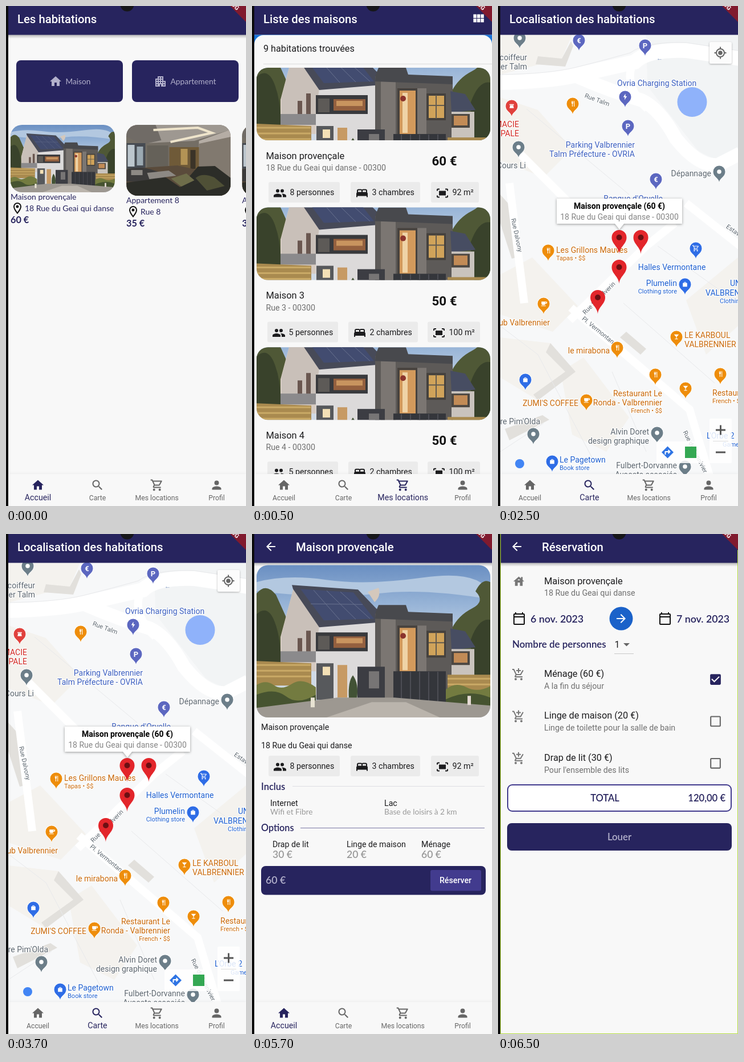
An HTML page with a canvas that plays this animation: 421 px wide and 875 px high, repeating every 8 s.

```html
<!DOCTYPE html>
<html lang="fr">
<head>
<meta charset="utf-8">
<title>Les habitations</title>
<style>
html, body { margin: 0; width: 100%; height: 100%; overflow: hidden; background: #f8f8f8; }
canvas { display: block; width: 421px; height: 875px; }
</style>
</head>
<body>
<canvas id="stage" width="421" height="875"></canvas>
<script>
const c = document.getElementById('stage').getContext('2d');
const W = 421, H = 875;
const NAVY = '#27245e', PAPER = '#f8f8f8', INK = '#1c1c1e', GRAY = '#707070', PALE = '#b2b0cb';
const ROBOTO = 'Roboto, sans-serif', LATO = 'Lato, sans-serif';
const ADDRESS = '18 Rue du Geai qui danse', ZIP = ' - 00300', HOME = 'Maison provençale';

const ICONS = {
  home: 'M10 20v-6h4v6h5v-8h3L12 3 2 12h3v8z',
  house: 'M19 9.3V4h-3v2.6L12 3 2 12h3v8h5v-6h4v6h5v-8h3zM10 10c0-1.1.9-2 2-2s2 .9 2 2z',
  search: 'M15.5 14h-.8l-.3-.3A6.5 6.5 0 1 0 13.7 14.4l.3.3v.8l5 5 1.5-1.5zM9.5 14A4.5 4.5 0 1 1 9.5 5 4.5 4.5 0 0 1 9.5 14z',
  cart: 'M15.55 13c.75 0 1.41-.41 1.75-1.03l3.58-6.49A1 1 0 0 0 20 4H5.21l-.94-2H1v2h2l3.6 7.59-1.35 2.44C4.52 15.37 5.48 17 7 17h12v-2H7l1.1-2zM6.16 6h12.15l-2.76 5H8.53zM7 18a2 2 0 1 0 0 4 2 2 0 0 0 0-4zM17 18a2 2 0 1 0 0 4 2 2 0 0 0 0-4z',
  person: 'M12 12a4 4 0 1 0 0-8 4 4 0 0 0 0 8zm0 2c-2.67 0-8 1.34-8 4v2h16v-2c0-2.66-5.33-4-8-4z',
  people: 'M16 11a3 3 0 1 0-3-3 3 3 0 0 0 3 3zM8 11a3 3 0 1 0-3-3 3 3 0 0 0 3 3zm0 2c-2.33 0-7 1.17-7 3.5V19h14v-2.5c0-2.33-4.67-3.5-7-3.5zm8 0l-1 .05c1.2.84 2 1.97 2 3.45V19h6v-2.5c0-2.33-4.67-3.5-7-3.5z',
  bed: 'M21 10.8V8a3 3 0 0 0-3-3h-4a3 3 0 0 0-2 .8A3 3 0 0 0 10 5H6a3 3 0 0 0-3 3v2.8A3 3 0 0 0 2 13v6h2v-2h16v2h2v-6a3 3 0 0 0-1-2.2zM14 7h4a1 1 0 0 1 1 1v2h-6V8a1 1 0 0 1 1-1zM5 8a1 1 0 0 1 1-1h4a1 1 0 0 1 1 1v2H5z',
  area: 'M17 4h3a2 2 0 0 1 2 2v2h-2V6h-3zM4 8V6h3V4H4a2 2 0 0 0-2 2v2zm16 8v2h-3v2h3a2 2 0 0 0 2-2v-2zM7 18H4v-2H2v2a2 2 0 0 0 2 2h3zM18 8H6v8h12z',
  flats: 'M17 11V3H7v4H3v14h8v-4h2v4h8V11z' +
    [[5, 17], [5, 13], [5, 9], [9, 13], [9, 9], [9, 5], [13, 13], [13, 9], [13, 5], [17, 17], [17, 13]]
      .map(([x, y]) => `M${x} ${y}h2v2h-2z`).join(''),
  place: 'M12 2a7 7 0 0 0-7 7c0 5.25 7 13 7 13s7-7.75 7-13a7 7 0 0 0-7-7zM7 9a5 5 0 0 1 10 0c0 2.9-2.9 7.2-5 9.9C9.9 16.2 7 11.9 7 9zM12 6.5a2.5 2.5 0 1 0 0 5 2.5 2.5 0 0 0 0-5z',
  back: 'M20 11H7.83l5.59-5.59L12 4l-8 8 8 8 1.41-1.41L7.83 13H20z',
  next: 'M12 4l-1.41 1.41L16.17 11H4v2h12.17l-5.58 5.59L12 20l8-8z',
  date: 'M20 3h-1V1h-2v2H7V1H5v2H4a2 2 0 0 0-2 2v16a2 2 0 0 0 2 2h16a2 2 0 0 0 2-2V5a2 2 0 0 0-2-2zM20 5v3H4V5zM20 21H4V10h16z',
  grid: 'M4 5h5v6H4zM10 5h5v6h-5zM16 5h5v6h-5zM4 12h5v6H4zM10 12h5v6h-5zM16 12h5v6h-5z',
  checked: 'M19 3H5a2 2 0 0 0-2 2v14a2 2 0 0 0 2 2h14a2 2 0 0 0 2-2V5a2 2 0 0 0-2-2zm-9 14l-5-5 1.4-1.4 3.6 3.6 7.6-7.6L19 8z',
  unchecked: 'M19 3H5a2 2 0 0 0-2 2v14a2 2 0 0 0 2 2h14a2 2 0 0 0 2-2V5a2 2 0 0 0-2-2zm0 16H5V5h14z',
  fork: 'M8 3v6a3 3 0 0 0 2 2.8V21h2v-9.2A3 3 0 0 0 14 9V3h-1.4v5h-1V3h-1.2v5h-1V3zM16 3v18h2V3z',
  cup: 'M5 5h15a3 3 0 0 1 0 7h-2a4 4 0 0 1-4 4H9a4 4 0 0 1-4-4zM18 7v3h2V7zM4 18h15v2H4z',
  glass: 'M4 4h16l-7 8v6h4v2H7v-2h4v-6z',
  bag: 'M5 8h3a4 4 0 0 1 8 0h3v12H5zM10 8h4a2 2 0 0 0-4 0z',
  bolt: 'M13 2L6 13h5l-1 9 8-12h-5z',
  jar: 'M5 6h14v3H5zM7 10h10l2 9H5z',
  dot: 'M12 6a6 6 0 1 0 0 12 6 6 0 0 0 0-12z'
};
for (const k in ICONS) ICONS[k] = new Path2D(ICONS[k]);

function text(s, x, y, size = 14.2, color = INK, o = {}) {
  c.font = `${o.w || 400} ${size}px ${o.f || ROBOTO}`;
  c.textAlign = o.a || 'left';
  c.fillStyle = color;
  if (o.halo) {
    c.strokeStyle = 'rgba(255,255,255,.85)';
    c.lineWidth = 2.5;
    c.lineJoin = 'round';
    c.strokeText(s, x, y);
  }
  c.fillText(s, x, y);
}
const lato = (s, x, y, size = 14, color = NAVY, w = 400, a = 'left') => text(s, x, y, size, color, { w, a, f: LATO });

function turned(s, x, y, deg, size, color, o) {
  c.save();
  c.translate(x, y);
  c.rotate(deg * Math.PI / 180);
  text(s, 0, size * .35, size, color, { a: 'center', ...o });
  c.restore();
}
function icon(name, x, y, color, size = 24) {
  c.save();
  c.translate(x - size / 2, y - size / 2);
  c.scale(size / 24, size / 24);
  c.fillStyle = color;
  c.fill(ICONS[name], 'evenodd');
  c.restore();
}
function rect(x, y, w, h, color) { c.fillStyle = color; c.fillRect(x, y, w, h); }
function round(x, y, w, h, r, color) {
  c.beginPath();
  c.roundRect(x, y, w, h, r);
  if (color) { c.fillStyle = color; c.fill(); }
}
function disc(x, y, r, color) { c.fillStyle = color; c.beginPath(); c.arc(x, y, r, 0, 7); c.fill(); }
function shape(color, d) { c.fillStyle = color; c.fill(new Path2D(d)); }
function line(color, width, d) { c.strokeStyle = color; c.lineWidth = width; c.stroke(new Path2D(d)); }
function fade(y0, y1, ...colors) {
  const g = c.createLinearGradient(0, y0, 0, y1);
  colors.forEach((k, i) => g.addColorStop(i / (colors.length - 1), k));
  return g;
}
function shadowed(blur, color, draw) {
  c.save();
  c.shadowBlur = blur;
  c.shadowColor = color;
  c.shadowOffsetY = 1;
  draw();
  c.restore();
}

// Picture drawn around (cx, cy) in its own units, cropped to a rounded box
function photo(x, y, w, h, baseW, cx, cy, draw) {
  c.save();
  round(x, y, w, h, 20);
  c.clip();
  c.translate(x + w / 2, y + h / 2);
  c.scale(w / baseW, w / baseW);
  c.translate(-cx, -cy);
  draw();
  c.restore();
}
const house = (x, y, w, h) => photo(x, y, w, h, 410, 213, 187.5, () => {
  rect(0, 50, 421, 275, fade(54, 200, '#6a8fc2', '#9ab6d8', '#cfdae6'));
  shape('#b3c8e0', 'M8 84Q60 70 130 80T300 76T418 104V114Q300 94 220 104T8 100z');
  shape('#4f5836', 'M8 104Q24 84 42 106L62 150V230H8zM350 166Q362 142 386 130T392 100Q404 76 418 84V262H350z');
  shape('#39422b', 'M8 140Q28 122 40 154T50 230H8zM384 184Q398 146 418 150V246H384z');
  shape('#d6cbc2', 'M73 94L50 180V240H225V150L118 160z');
  shape('#c9c0b9', 'M73 94L52 176V212H110L118 160z');
  shape('#dcdada', 'M118 160L228 152V288H112V205z');
  shape('#474a58', 'M70 89L186 97 240 153 118 163 72 96z');
  shape('#424c70', 'M85 96L178 102 214 148 126 151z');
  line('#69728f', 1, 'M108 98L154 150M131 99L182 149M155 101L207 148M103 122L194 123');
  shape('#d4c8bc', 'M203 101L222 94Q227 108 215 119z');
  shape('#6a5750', 'M80 182h8v24h-8zM95 169h8v37h-8z');
  shape('#8b8a8c', 'M50 205H112V224H50z');
  rect(112, 172, 91, 33, '#393a3d');
  rect(143, 179, 56, 20, '#94603f');
  rect(148, 182, 46, 9, '#c8945f');
  rect(116, 178, 20, 24, '#5d5a57');
  shape('#5d5a58', 'M216 139L352 150V296H216z');
  shape('#7b7672', 'M226 148H252V290H226zM290 160H306V290H290z');
  shape('#48494d', 'M217 136L222 124H270L274 136 352 139V153L216 148z');
  rect(255, 160, 35, 84, '#47423e');
  rect(259, 164, 28, 76, '#d39a5c');
  rect(264, 168, 9, 70, '#efd3a6');
  disc(265, 178, 5, '#8b342d');
  rect(306, 169, 34, 47, '#45413d');
  rect(310, 173, 27, 39, '#d0a35a');
  line('#625b50', 2, 'M323 172V213M310 190H337');
  shape('#474d62', 'M348 165L374 170 392 198 350 203z');
  rect(350, 201, 40, 50, '#c9c3bd');
  rect(350, 205, 32, 24, '#4c4742');
  rect(354, 208, 24, 17, '#c28b56');
  shape('#a98a4f', 'M8 222L104 226V265H8zM343 246H418V274H343z');
  line('#c9a966', 3, 'M8 229H103M8 239H103M8 249H103M343 253H418M343 263H418');
  shape('#737b40', 'M8 264Q24 254 38 264T70 262T112 268V304H8zM340 272Q356 258 376 268T418 266V302H340z');
  shape('#465330', 'M8 281Q40 268 60 284T112 281V304H8zM340 289Q380 270 418 286V302H340z');
  rect(113, 226, 30, 64, '#57595c');
  rect(124, 232, 13, 15, '#f3e0b6');
  rect(150, 229, 17, 57, '#c79a64');
  shape('#425235', 'M170 288Q168 258 177 247Q188 262 184 288z');
  rect(185, 232, 48, 62, '#3c3d43');
  rect(205, 240, 18, 30, '#777575');
  rect(248, 240, 92, 57, '#34363b');
  line('#4c4d54', 2, 'M262 241V297M278 241V297M294 241V297M310 241V297M326 241V297');
  shape('#9d9891', 'M8 304L150 286H250L418 300V322H8z');
  shape('#bab4ac', 'M130 321L210 294H270L330 321z');
  rect(103, 286, 7, 17, '#e7e2d2');
  rect(378, 283, 6, 16, '#e4d9d2');
});
const lounge = (x, y) => photo(x, y, 183, 124, 183, 302, 270, () => {
  rect(205, 200, 200, 140, '#746e65');
  shape('#9e9891', 'M205 200H405V213L330 236 246 240 211 226z');
  shape('#706b66', 'M211 208H262L272 235 240 242 211 229z');
  line('#eee4cb', 4, 'M258 217L336 213 361 222 288 238');
  shape('#b5ada5', 'M338 236L394 216V332H338z');
  shape('#81796f', 'M338 241L394 229V332H338z');
  rect(211, 240, 33, 47, '#464b52');
  rect(213, 243, 12, 38, '#bcc6cd');
  rect(229, 246, 11, 33, '#9ba9b2');
  rect(247, 244, 37, 44, '#656159');
  rect(286, 247, 52, 41, '#6f5a38');
  rect(306, 250, 12, 28, '#b39355');
  rect(323, 252, 9, 33, '#3b3428');
  shape('#5a4b3b', 'M211 285L300 279 350 290 394 301V332H211z');
  shape('#3c3b3b', 'M211 286Q236 279 260 288L280 294 276 310 211 307z');
  shape('#8d8984', 'M219 287H239V296H219zM247 292L285 288 298 297 251 303z');
  shape('#2c2d28', 'M211 309L280 300 305 317 336 281 366 280 394 301V332H211z');
  shape('#4f5036', 'M332 301Q344 291 365 300L383 315 352 323z');
  shape('#6e6d4a', 'M289 302L316 293 330 305 307 316z');
});

function bar(title, back, lift = true) {
  if (lift) rect(4, 50, 417, 7, fade(50, 57, 'rgba(0,0,0,.28)', 'rgba(0,0,0,0)'));
  rect(4, 0, 417, 50.5, NAVY);
  if (back) icon('back', 33, 22, '#fff');
  text(title, back ? 77 : 20, 29.5, 20.3, '#fff', { w: 500 });
}
function frame() {
  shape('#801a2e', 'M393 0H421V28z');
  turned('BUG', 400, -2, 45, 10.5, '#fff', { w: 700 });
  disc(212.5, -2.5, 12, '#17171a');
  rect(0, 0, 4, H, '#0c0c0d');
}
const TABS = [['home', 'Accueil', 56], ['search', 'Carte', 160.5], ['cart', 'Mes locations', 264.7], ['person', 'Profil', 369.5]];
function tabs(active) {
  shadowed(5, 'rgba(0,0,0,.1)', () => rect(4, 819, 417, 56, PAPER));
  TABS.forEach(([name, label, x], i) => {
    const on = i === active, color = on ? NAVY : '#666';
    icon(name, x, 838.5, color);
    text(label, x, 864.5, on ? 14.2 : 12.2, color, { a: 'center' });
  });
}
function chips(y, xs, widths, labels) {
  ['people', 'bed', 'area'].forEach((name, i) => {
    round(xs[i], y, widths[i], 36, 3, '#ebebeb');
    icon(name, xs[i] + 20, y + 19.5, INK);
    text(labels[i], xs[i] + 37.5, y + 23);
  });
}
const firstChips = y => chips(y, [29, 173, 314], [125, 122, 84], ['8 personnes', '3 chambres', '92 m²']);

function offer(x, y, title, place, price) {
  lato(title, x, y);
  icon('place', x + 12, y + 15.5, '#111');
  lato(place, x + 25, y + 20);
  lato(price, x, y + 41, 16.3, NAVY, 700);
}
function homeScreen() {
  bar('Les habitations');
  round(18, 95, 187, 73, 8, NAVY);
  round(221, 95, 187, 73, 8, NAVY);
  icon('home', 87, 132, PALE);
  icon('flats', 271, 132, PALE);
  lato('Maison', 104.5, 137, 13.7, PALE);
  lato('Appartement', 288.5, 137, 13.8, PALE);
  house(8, 208, 183, 118);
  lounge(211, 208);
  lounge(414, 208);
  offer(8, 338.5, HOME, ADDRESS, '60 €');
  offer(211, 344.5, 'Appartement 8', 'Rue 8', '35 €');
  offer(414, 344.5, 'Appartement 9', 'Rue 9', '35 €');
  tabs(0);
}

function listScreen() {
  bar('Liste des maisons', false, false);
  icon('grid', 397, 22, '#fff', 26);
  rect(4, 50.5, 417, 20, '#1873d8');
  round(4, 51, 417, 824, [16, 16, 0, 0], PAPER);
  text('9 habitations trouvées', 20, 80, 16.2);
  rect(20, 101, 401, 1, '#dcdcdc');
  [[HOME, ADDRESS, '60 €'], ['Maison 3', 'Rue 3', '50 €'], ['Maison 4', 'Rue 4', '50 €']].forEach(([name, place, price], i) => {
    const y = 108 + i * 244.6;
    house(8, y, 410, 127);
    text(name, 24.5, y + 159.5, 16.4);
    text(place + ZIP, 24.5, y + 180, 14.2, GRAY);
    text(price, 315.5, y + 171, 22.3, '#111', { w: 700 });
    if (i) chips(y + 200, [27, 169, 308], [124, 122, 92], ['5 personnes', '2 chambres', '100 m²']);
    else firstChips(y + 200);
  });
  tabs(2);
}

const INDIGO = '#5c67c0', ORANGE = '#ee8d0b', BLUE = '#2f6de6', SLATE = '#6c7e89';
const SHOP = '#1d5fd0', FOOD = '#c9690a', PARK = '#3c5fc0', PLAIN = '#5d6770';
function pin(x, y, color, glyph) {
  const d = `M${x} ${y + 18}C${x - 1} ${y + 11} ${x - 10.5} ${y + 9} ${x - 10.5} ${y}a10.5 10.5 0 0 1 21 0C${x + 10.5} ${y + 9} ${x + 1} ${y + 11} ${x} ${y + 18}z`;
  line('#fff', 1.6, d);
  shape(color, d);
  if (ICONS[glyph]) icon(glyph, x, y, '#fff', glyph === 'dot' ? 15 : 13);
  else text(glyph, x, y + 4.7, 13, '#fff', { w: 700, a: 'center' });
}
function marker(x, y) {
  shape('#e3262b', `M${x} ${y}C${x - 1} ${y - 13} ${x - 13} ${y - 17} ${x - 13} ${y - 29}a13 13 0 0 1 26 0C${x + 13} ${y - 17} ${x + 1} ${y - 13} ${x} ${y}z`);
  disc(x, y - 29, 5, '#6c1013');
}
function label(color, x, y, rows, a = 'left', small) {
  rows.forEach((s, i) => text(s, x, y + i * 15.5, 14, color, { a, halo: true }));
  if (small) text(small, x, y + rows.length * 15.5 - 2.5, 11, color, { a, halo: true });
}
function streets() {
  rect(4, 50, 417, 770, '#f7f8f9');
  shape('#f4f2ee', 'M4 50H130L112 92 4 120zM4 160L70 182 130 250 80 300 4 270zM4 470L60 440 140 525 96 570 4 540zM4 580L92 590 136 640 70 690 4 650zM110 640L150 615 230 720 190 780 130 750zM330 515L421 440V560L365 610z');
  shape('#e2e0dc', 'M70 88L112 92 128 62 132 70 118 106 66 102zM4 330L22 350 34 440 24 442 4 380zM92 590L136 640 70 690 62 680 118 640 84 606zM12 740L78 716 90 724 20 760zM225 570L260 600 250 610 214 580z');
  shape('#f2f4f5', 'M260 50H421V258Q390 280 350 252L262 140z');
  line('#fff', 26, 'M0 134Q90 132 138 121T240 98Q262 76 330 78L425 92');
  line('#fff', 24, 'M140 124Q200 150 252 165Q284 180 312 232Q352 282 386 278L425 258');
  line('#fff', 14, 'M236 102Q220 140 262 180M126 550L260 420 310 380M128 528L336 706 372 825M20 310L46 520M40 260L150 370M330 345L425 420');
  line('#e8e9eb', 1, 'M4 120Q90 119 138 107T232 82Q258 62 330 64L421 78M50 180L230 330M4 560L70 610 170 800M220 520L380 660M280 420L421 520M200 640L260 780M4 780L80 730');
  disc(340.5, 168, 26, '#8fb2fa');
  text('←', 278, 95, 11, '#7993c0');
}
function mapScreen() {
  c.save();
  c.beginPath();
  c.rect(4, 50, 417, 769);
  c.clip();
  streets();
  const way = { halo: true };
  turned('Rue Talm', 174, 164, 20, 11, PLAIN, way);
  turned('Rue Dalvony', 33, 401, 78, 11, PLAIN, way);
  turned('Rue S. Malverin', 177, 511, -45, 11, PLAIN, way);
  turned('Pl. Vermontane', 178, 569, 39, 11, PLAIN, way);
  turned('Rue du Tonnivier', 346, 780, 63, 11, PLAIN, way);
  turned('Estavo', 415, 394, 35, 11, PLAIN, way);

  label(PLAIN, 51, 95, ['coiffeur', 'er Talm'], 'right');
  label(PARK, 209, 140, ['Ovria Charging Station']);
  label('#d0251f', 37, 212, ['MACIE', 'PALE'], 'right');
  label(PARK, 240, 248, ['Parking Valbrennier', 'Talm Préfecture - OVRIA'], 'right');
  label(PLAIN, 49, 284, ['Cours Li'], 'right');
  label(PLAIN, 374, 298, ['Dépannage'], 'right');
  label(PARK, 289, 342, ["Banque d'Orvelle"], 'right');
  label(FOOD, 102, 431.5, ['Les Grillons Mauves'], 'left', 'Tapas • $$');
  label(SHOP, 305, 462, ['Halles Vermontane'], 'center');
  label(SHOP, 314, 490, ['Plumelin'], 'right', 'Clothing store');
  label(SHOP, 407, 490, ['UN']);
  label(SHOP, 364, 507, ['VALBRENNIER']);
  text('Clothing', 389, 520, 11, SHOP, way);
  label(FOOD, 91, 559, ['Pub Valbrennier'], 'right');
  label(FOOD, 327, 581, ['LE KARBOUL', 'VALBRENNIER']);
  label(FOOD, 196, 608, ['le mirabona'], 'right');
  label(FOOD, 288, 683, ['Restaurant Le', 'Ronda - Valbrennier'], 'right', 'French • $$');
  label(FOOD, 376, 682, ['Restaurant'], 'left', 'French • $$');
  label(FOOD, 141, 700, ["ZUMI'S COFFEE"], 'right');
  label(PLAIN, 74, 732, ["re Pim'Olda"], 'right');
  label(PLAIN, 265, 750, ['Alvin Doret', 'design graphique'], 'right');
  label(SHOP, 108, 799, ['Le Pagetown'], 'left', 'Book store');
  label(PLAIN, 314, 809, ['Fulbert-Dorvanne', 'Avocats associés'], 'right');
  label(SHOP, 366, 757, ["L'Orbe 2"]);
  text('Games', 394, 771, 11, SHOP, way);

  [[38, 56, SLATE, 'dot'], [36, 247, SLATE, 'dot'], [388, 290, SLATE, 'dot'], [62, 749, SLATE, 'dot'],
   [279, 747, SLATE, 'dot'], [328, 806, SLATE, 'dot'], [142, 60, INDIGO, '€'], [277, 303, INDIGO, '€'],
   [258, 69, INDIGO, 'P'], [228, 210, INDIGO, 'P'], [223, 159, INDIGO, 'bolt'], [24, 175, '#e0413c', 'jar'],
   [131, 171, ORANGE, 'fork'], [88, 428, ORANGE, 'fork'], [209, 598, ORANGE, 'fork'], [276, 645, ORANGE, 'fork'],
   [390, 644, ORANGE, 'fork'], [80, 521, ORANGE, 'cup'], [155, 690, ORANGE, 'cup'], [313, 579, ORANGE, 'glass'],
   [329, 669, ORANGE, 'glass'], [347, 424, BLUE, 'cart'], [328, 487, BLUE, 'bag'], [48, 654, BLUE, 'bag'], [95, 797, BLUE, 'bag']
  ].forEach(p => pin(...p));
  [[212.5, 434], [250.5, 434], [212.5, 486], [175, 539]].forEach(p => marker(...p));

  shadowed(4, 'rgba(0,0,0,.4)', () => shape('#fff', 'M103 337H323V381H221L213 391 205 381H103z'));
  text(HOME + ' (60 €)', 213, 355, 14, '#000', { w: 700, a: 'center' });
  text(ADDRESS + ZIP, 213, 374, 14, '#858585', { a: 'center' });

  const panel = 'rgba(255,255,255,.84)';
  shadowed(3, 'rgba(0,0,0,.3)', () => round(371, 63, 39, 38, 2, '#fcfcfc'));
  round(371, 722, 39, 78, 2, panel);
  round(278, 762, 80, 38, 2, panel);
  line('#666', 2, 'M383 82a7 7 0 1 0 14 0a7 7 0 1 0-14 0M390 71.5V75M390 89V92.5M379.5 82H383M397 82H400.5');
  disc(390, 82, 3.8, '#666');
  rect(377, 761, 27, 1, '#ddd');
  line('#555', 2.8, 'M382 742H399M390.5 733.5V750.5M382 781H399');
  shape('#2f74e4', 'M297.5 770.5L308 781 297.5 791.5 287 781z');
  line('#fff', 2, 'M293.5 785V780H301M298.5 777L301.5 780 298.5 783');
  rect(328, 771, 20, 20, '#34a853');
  disc(38, 801, 8, '#4285f4');
  c.restore();
  bar('Localisation des habitations', false, false);
  tabs(1);
}

function detailScreen() {
  bar(HOME, true);
  house(8, 54.5, 410, 266.5);
  text(HOME, 16, 342.5);
  text(ADDRESS, 16, 375);
  firstChips(388);
  lato('Inclus', 16, 447.5, 16.5, NAVY, 600);
  rect(71, 441, 337, 1, '#dedee4');
  lato('Options', 16, 520, 16.2, NAVY, 600);
  rect(85, 514, 323, 1, '#7a78a5');
  [[32, 'Internet', 'Wifi et Fibre'], [232, 'Lac', 'Base de loisirs à 2 km']].forEach(([x, name, note]) => {
    text(name, x, 475.5);
    lato(note, x, 491, 13.6, '#999');
  });
  [[36, 'Drap de lit', '30 €'], [166, 'Linge de maison', '20 €'], [297, 'Ménage', '60 €']].forEach(([x, name, price]) => {
    text(name, x, 548);
    lato(price, x, 566.5, 17.5, '#999', 600);
  });
  round(16, 581, 394, 50.5, 8, NAVY);
  lato('60 €', 24, 612, 17.8, PALE, 600);
  round(313, 588, 89, 36.5, 3, '#423b8e');
  text('Réserver', 357, 611, 14.2, '#fff', { w: 500, a: 'center' });
  tabs(0);
}

function addCart(x, y) {
  c.save();
  c.translate(x - 12, y - 12);
  line('#777', 2, 'M1 3H3.6L7.9 12H15.6L20 4.4M7.9 12L6.2 15Q5.7 16 7 16H19M12 1V9M8 5H16');
  disc(7, 20, 2, '#777');
  disc(17, 20, 2, '#777');
  c.restore();
}
function bookingScreen() {
  bar('Réservation', true);
  icon('house', 36.5, 83, '#777', 23);
  text(HOME, 81, 87.5, 16.4);
  text(ADDRESS, 81, 108, 14.2, GRAY);
  icon('date', 37, 148, '#111');
  icon('date', 293, 148, '#111');
  lato('6 nov. 2023', 57, 155, 17.8, NAVY, 600);
  lato('7 nov. 2023', 313, 155, 17.8, NAVY, 600);
  disc(216, 148, 20.5, '#1b62c9');
  icon('next', 216, 148, '#fff');
  lato('Nombre de personnes', 25, 198.5, 16.9, NAVY, 600);
  text('1', 204.5, 199, 16.2);
  shape('#666', 'M220 191H231L225.5 196.5z');
  rect(204, 209, 34, 1, '#c8c8c8');
  [['Ménage (60 €)', 'A la fin du séjour'],
   ['Linge de maison (20 €)', 'Linge de toilette pour la salle de bain'],
   ['Drap de lit (30 €)', "Pour l'ensemble des lits"]].forEach(([name, note], i) => {
    const y = 250 + i * 73.4;
    addCart(36, y - 4);
    text(name, 81, y, 16.3);
    text(note, 81, y + 21, 14.2, GRAY);
    icon(i ? 'unchecked' : 'checked', 381.5, y + 4.5, i ? '#666' : NAVY, 25);
  });
  round(17, 439, 392, 46, 8, '#fff');
  c.strokeStyle = '#423b8e';
  c.lineWidth = 2;
  c.stroke();
  lato('TOTAL', 187.5, 467.5, 16.5, NAVY, 600, 'center');
  lato('120,00 €', 399, 467.5, 16.6, NAVY, 600, 'right');
  round(16, 506, 394, 48, 8, NAVY);
  lato('Louer', 213, 536, 16.8, PALE, 600, 'center');
  line('#b4dc3c', 1, 'M4.5 0V874.5H420.5V28');
}

const SCENES = [[0, homeScreen], [500, listScreen], [2500, mapScreen], [4500, detailScreen], [6500, bookingScreen]];
const LOOP = 8000, start = performance.now();
let shown;
function tick() {
  const t = (performance.now() - start) % LOOP;
  const draw = SCENES.findLast(([from]) => t >= from)[1];
  if (draw !== shown) {
    shown = draw;
    rect(0, 0, W, H, PAPER);
    draw();
    frame();
  }
  requestAnimationFrame(tick);
}
tick();
</script>
</body>
</html>
```
